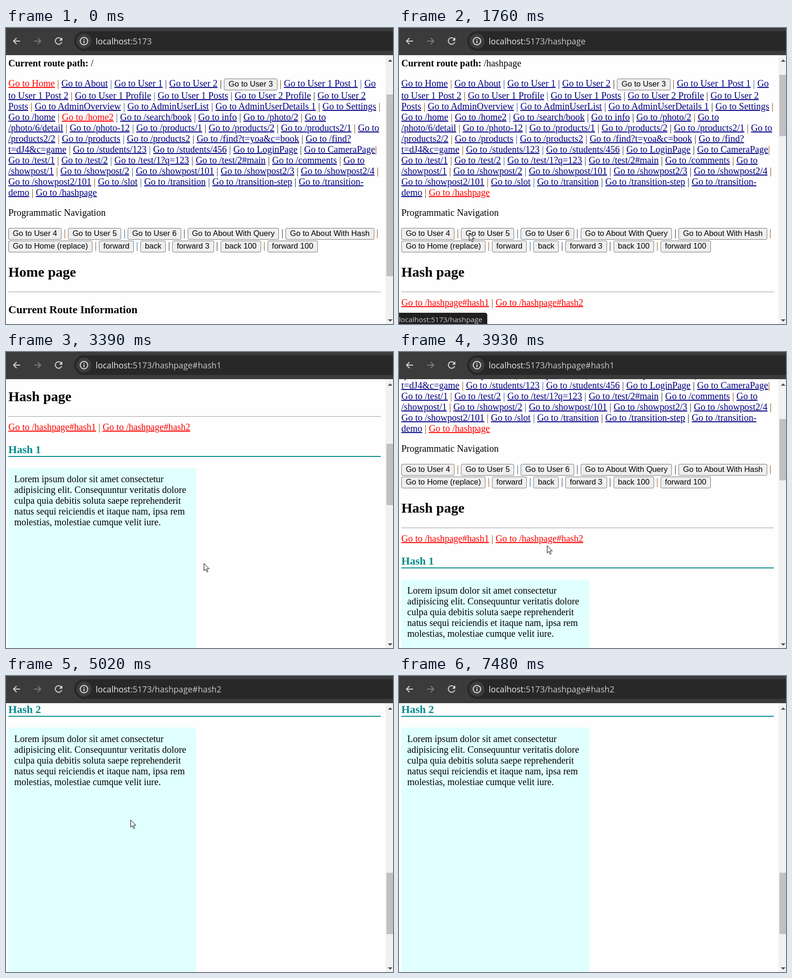
These frames come from a looping animation (824 px wide and 632 px high, 7.81 s). An HTML page:

```html
<!DOCTYPE html>
<html lang="en">
<head>
<meta charset="utf-8">
<title>Hash navigation</title>
<style>
html, body { margin: 0; width: 100%; height: 100%; overflow: hidden; background: #fff; }
#stage { position: relative; width: 824px; height: 632px; overflow: hidden; background: #fefefe; }
#stage div, #stage svg { position: absolute; }
#view { left: 0; top: 58px; width: 808px; height: 574px; overflow: hidden; }
#page { left: 0; top: -58px; width: 808px; font: 20px/23px "Liberation Serif", "Times New Roman", serif; color: #000; }
#page > div, section > div { left: 5px; white-space: pre; }
u { color: #000080; }
i { font-style: normal; color: #8a4a00; }
i:nth-of-type(4n+2) { color: #1c5f95; }
i:nth-of-type(4n+3) { color: #3c2468; }
i:nth-of-type(4n) { color: #222; }
.onhome .home, .onhash .hash { color: #f00; }
.onhome #hashpage, .onhash #homepage { display: none; }
#page span.btn {
  display: inline-block; margin: -3px 0; padding: 1.5px 8.4px 3px; border: 1px solid #767676; border-radius: 3px;
  background: #efefef; font: 16.67px/19px "Liberation Sans", Arial, sans-serif;
}
#page .h1 { font-size: 30px; line-height: 34px; font-weight: bold; }
#page .h3 { font-size: 23.4px; line-height: 27px; font-weight: bold; }
#page .mark { width: 793px; color: #008b8b; border-bottom: 2px solid #008b8b; }
#page .hr { width: 793px; height: 1px; background: #9a9a9a; }
#page .box { box-sizing: border-box; width: 400px; height: 775px; padding: 12.5px; background: #e0ffff; }
#bar { left: 808px; top: 58px; width: 16px; height: 574px; background: #f1f1f1; }
#thumb { left: 810px; width: 14px; background: #c1c1c1; }
#url { left: 191px; top: 16px; font: 17.7px/24px "Open Sans", "Noto Sans", sans-serif; color: #c9c9c9; white-space: pre; }
#url b { font-weight: normal; color: #ececec; }
#status {
  left: 0; height: 28px; padding-right: 10px; border-radius: 0 5px 0 0; background: #202020;
  font: 15.25px/29px "Open Sans", "Noto Sans", sans-serif; color: #c8c8c8; white-space: pre;
}
</style>
</head>
<body>
<div id="stage">
  <div id="view"><div id="page"></div></div>
  <div id="bar"></div>
  <div id="thumb"></div>
  <svg width="824" height="632" fill="none" stroke-width="2">
    <path d="M0 0H824V58H0Z" fill="#3b3b3b"/>
    <path d="M824 7H166a21 21 0 0 0 0 42H824Z" fill="#282828"/>
    <circle id="hover" cy="28" r="20" fill="#505050"/>
    <path d="M30 28H16M22.5 21.5L16 28l6.5 6.5" stroke="#d6d6d6"/>
    <path id="forward" d="M60 28H74M67.5 21.5L74 28l-6.5 6.5"/>
    <path d="M118.7 30A7 7 0 1 1 117.5 23.3" stroke="#d6d6d6"/>
    <path d="M120 20v7h-7Z" fill="#d6d6d6"/>
    <circle cx="166" cy="28" r="16" fill="#3d3d3d"/>
    <circle cx="166" cy="28" r="8" stroke="#e4e4e4"/>
    <path d="M166 27v5.5M166 23.5v2" stroke="#e4e4e4"/>
    <path d="M813 72l5-5 5 5ZM813 622l5 5 5-5Z" fill="#505050"/>
  </svg>
  <div id="url"><b>localhost</b>:5173<span id="path"></span></div>
  <div id="status"></div>
  <svg width="824" height="632">
    <g id="cursor" fill="#fff" stroke="#000" stroke-linejoin="round">
      <path id="arrow" d="M.5.5V16L4 12.7 6.6 18.7 9 17.7 6.5 11.8H11.5Z"/>
      <path id="hand" transform="translate(-6)" d="M5 1.5C5 .2 7.5 .2 7.5 1.5V7.5C9.5 6.8 10.5 7.5 10.5 8.5c1.5-.6 2.5 0 2.5 1 1.3-.4 2.2.3 2.2 1.4V15c0 3-2 5.5-5 5.5H8c-2 0-3-1-4-3L.8 12.5c-1-1.6.8-2.6 2-1.4L5 13Z"/>
    </g>
  </svg>
</div>
<script>
const $ = id => document.getElementById(id);
const LOOP = 7810;
const HASH1 = 563, HASH2 = 1414;

const links = [
  'Go to Home | Go to About | Go to User 1 | Go to User 2 | [Go to User 3] | Go to User 1 Post 1 | Go',
  'to User 1 Post 2 | Go to User 1 Profile | Go to User 1 Posts | Go to User 2 Profile | Go to User 2',
  'Posts | Go to AdminOverview | Go to AdminUserList | Go to AdminUserDetails 1 | Go to Settings |',
  'Go to /home | Go to /home2 | Go to /search/book | Go to info | Go to /photo/2 | Go to',
  '/photo/6/detail | Go to /photo-12 | Go to /products/1 | Go to /products/2 | Go to /products2/1 | Go to',
  '/products2/2 | Go to /products | Go to /products2 | Go to /find?t=yoa&c=book | Go to /find?',
  't=dJ4&c=game | Go to /students/123 | Go to /students/456 | Go to LoginPage | Go to CameraPage|',
  'Go to /test/1 | Go to /test/2 | Go to /test/1?q=123 | Go to /test/2#main | Go to /comments | Go to',
  '/showpost/1 | Go to /showpost/2 | Go to /showpost/101 | Go to /showpost2/3 | Go to /showpost2/4 |',
  'Go to /showpost2/101 | Go to /slot | Go to /transition | Go to /transition-step | Go to /transition-',
  'demo | Go to /hashpage'
];
const buttons = [
  '[Go to User 4] | [Go to User 5] | [Go to User 6] | [Go to About With Query] | [Go to About With Hash] |',
  '[Go to Home (replace)] | [forward] | [back] | [forward 3] | [back 100] | [forward 100]'
];
const lorem = `Lorem ipsum dolor sit amet consectetur
adipisicing elit. Consequuntur veritatis dolore
culpa quia debitis soluta saepe reprehenderit
natus sequi reiciendis et itaque nam, ipsa rem
molestias, molestiae cumque velit iure.`;

const block = (top, html, cls = '') => `<div class="${cls}" style="top:${top}px">${html}</div>`;

function linkClass(text) {
  if (text === 'Go to Home' || text === 'Go to /home2') return 'home';
  return text.includes('/hashpage') ? 'hash' : '';
}

// Bars separate the items; square brackets mark buttons.
const row = text => text.replace(/\||[^|\s](?:[^|]*[^|\s])?/g, item =>
  item === '|' ? '<i>|</i>'
  : item[0] === '[' ? `<span class="btn">${item.slice(1, -1)}</span>`
  : `<u class="${linkClass(item)}">${item}</u>`);

const hashSection = (n, top, boxTop) => block(top, `Hash ${n}`, 'h3 mark') + block(boxTop, lorem, 'box');

$('page').innerHTML =
  block(64, '<b>Current route path:</b> <span id="route"></span>') +
  links.map((text, i) => block(i ? 110 + 23 * i : 107, row(text))).join('') +
  block(383, 'Programmatic Navigation') +
  buttons.map((text, i) => block(426 + 27 * i, row(text))).join('') +
  block(563, '', 'hr') +
  '<section id="homepage">' + block(504, 'Home page', 'h1') + block(588, 'Current Route Information', 'h3') + '</section>' +
  '<section id="hashpage">' + block(504, 'Hash page', 'h1') +
  block(575, row('Go to /hashpage#hash1 | Go to /hashpage#hash2')) +
  hashSection(1, 621, 673.5) + hashSection(2, 1472, 1524.3) + '</section>';

// Bursts of change: start, end, number of steps.
const bursts = [
  [200, 960, 11], [1030, 1290, 5], [1760, 2120, 6], [2390, 2590, 3], [2920, 3660, 11], [3730, 3930, 4],
  [4080, 4210, 3], [4350, 4670, 6], [5020, 5770, 12], [5830, 6040, 4], [6240, 6990, 12], [7060, 7480, 7]
];
const paths = [[0, ''], [1095, '/hashpage'], [2390, '/hashpage#hash1'], [4414, '/hashpage#hash2'],
  [5830, '/hashpage#hash1'], [6780, '/hashpage#hash2']];
const hints = [[0, ''], [1030, '/hashpage'], [1830, ''], [2040, '/hashpage#hash1'], [2900, ''],
  [4350, '/hashpage#hash2'], [4660, '']];
const hovers = [[0, 0], [5830, 22], [6300, 0], [6500, 67], [6780, 0]];
const hands = [[0, false], [870, true], [1760, false], [2040, true], [2580, false], [4140, true], [4540, false]];
const scrolls = [[0, 0], [2390, 0], [2390, HASH1], [3142, HASH1], [3364, 426], [3660, 188], [4414, 188],
  [4414, HASH2], [5830, HASH2], [5830, HASH1], [6780, HASH1], [6780, HASH2]];
const moves = [[200, 237, 531], [960, 130, 350], [1290, 130, 350], [1760, 149, 438], [2120, 135, 588],
  [2590, 134, 589], [2920, 160, 575], [3364, 421, 451], [3660, 289, 333], [3930, 315, 413], [4210, 317, 402],
  [4670, 317, 401], [5020, 265, 307], [5770, 18, 22], [6240, 21, 23], [6580, 60, 27], [6990, 60, 27],
  [7060, 108, 70], [7410, 730, 592]];

function snap(t) {
  const burst = bursts.findLast(([start]) => start <= t);
  if (!burst) return 0;
  const [start, end, count] = burst;
  const step = (end - start) / (count - 1);
  return Math.min(end, start + step * Math.floor((t - start) / step + 1e-6));
}

const current = (table, t) => table.findLast(([time]) => time <= t)[1];

function track(keys, t) {
  const i = Math.max(0, keys.findLastIndex(([time]) => time <= t));
  const a = keys[i], b = keys[i + 1] || a;
  const k = b === a ? 0 : Math.max(0, (t - a[0]) / (b[0] - a[0]));
  return a.slice(1).map((v, n) => Math.round(v + (b[n + 1] - v) * k));
}

function render(time) {
  const t = snap(time);
  const path = current(paths, t), hint = current(hints, t), hover = current(hovers, t), hand = current(hands, t);
  const [scroll] = track(scrolls, t);
  const [x, y] = track(moves, t);

  $('path').textContent = path;
  $('route').textContent = path || '/';
  $('page').className = path ? 'onhash' : 'onhome';
  $('page').style.transform = `translateY(${-scroll}px)`;
  $('thumb').style.top = (path ? Math.round(100 + scroll * 0.2263) : 142) + 'px';
  $('thumb').style.height = (path ? 131 : 388) + 'px';

  $('status').style.display = hint ? '' : 'none';
  $('status').style.top = (t >= 2580 && t < 2900 ? 610 : 608) + 'px';
  $('status').textContent = 'localhost:5173' + hint;

  $('hover').style.display = hover ? '' : 'none';
  $('hover').setAttribute('cx', hover);
  $('forward').setAttribute('stroke', t >= 5830 && t < 6780 ? '#d6d6d6' : '#7c7c7c');

  $('cursor').style.display = t >= 200 && t < 7480 ? '' : 'none';
  $('cursor').setAttribute('transform', `translate(${x} ${y})`);
  $('arrow').style.display = hand ? 'none' : '';
  $('hand').style.display = hand ? '' : 'none';
}

const began = performance.now();
function frame() {
  render((performance.now() - began) % LOOP);
  requestAnimationFrame(frame);
}
frame();
</script>
</body>
</html>
```
